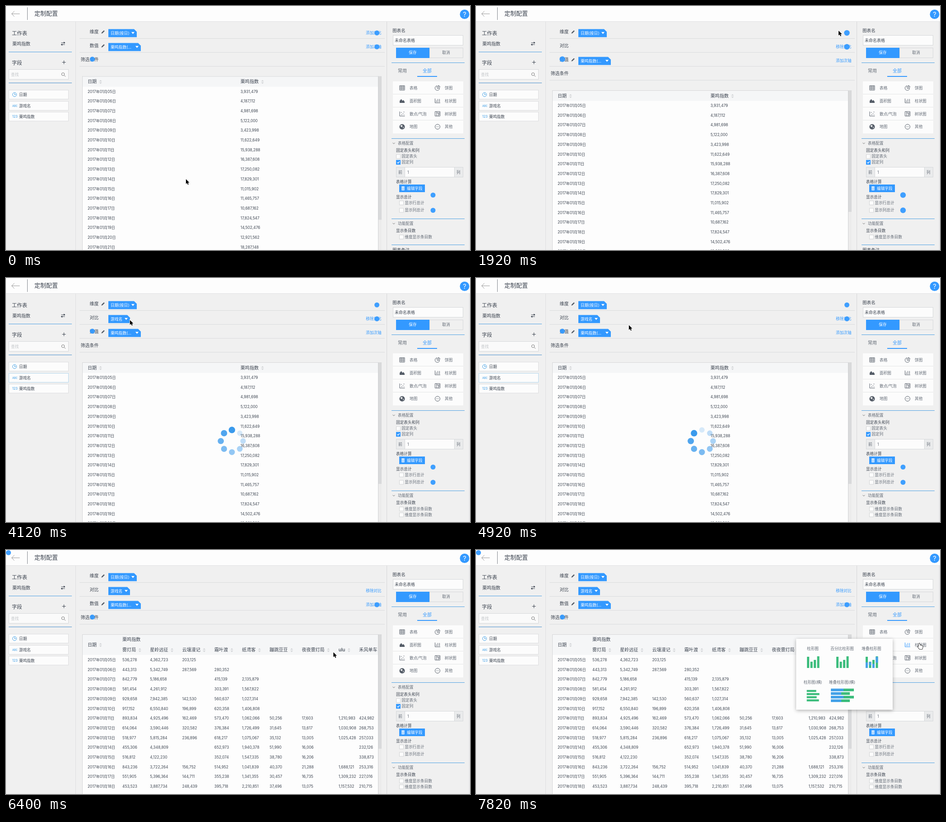
An HTML page with a canvas that plays this animation: 1029x544 px, repeating every 8000 ms.

```html
<!DOCTYPE html>
<html lang="zh-CN">
<head>
<meta charset="utf-8">
<style>
html, body { margin: 0; width: 100%; height: 100%; overflow: hidden; background: #f0f0f0; }
canvas { display: block; }
</style>
</head>
<body>
<canvas id="stage" width="1029" height="544"></canvas>
<script>
const c = document.getElementById('stage').getContext('2d');
const LOOP = 8000, ADD_ROW = 1450, GRAB = 3080, DROP = 3850, LOADED = 5300, PIE = 6850, BARS = 7200;
const BLUE = '#3399ff', INK = '#3c4450', SOFT = '#626a75', EDGE = '#d6d8da', PAPER = '#fcfcfc';
const GREEN = '#3dbd7d', SKY = '#45a2e8', METRIC = '栗鸣指数';

// Game name, lowest daily value, first day with data
const games = [['雾灯局', 43e4, 0], ['星岭远征', 34e5, 0], ['云壤漫记', 14e4, 0], ['霜叶渡', 28e4, 1],
  ['纸鸢客', 1e6, 2], ['蹦跳豆豆', 3e4, 6], ['夜夜雾灯局', 13e3, 6], ['ulu', 1e6, 6], ['禾风单车', 21e4, 6]];

const random = (i, j) => {
  const v = Math.sin(i * 12.99 + j * 78.23 + 4) * 43758.55;
  return v - Math.floor(v);
};
const group = n => Math.round(n).toLocaleString('en-US');
const total = i => group(i < 5 ? 29e5 + 32e5 * random(i, 9) : 105e5 + 8e6 * random(i, 9));
function gameValue(i, j) {
  const [, low, start] = games[j];
  const gap = j % 5 === 2 && (i % 7) >> 1 === 1;
  return i < start || gap ? '' : group(low * (1 + 1.4 * random(i, j) ** 2));
}

// Pointer moves: start, end, x, y
const moves = [[90, 1040, 812, 57], [1450, 1900, 804, 55], [2210, 2850, 85, 222], [3080, 3280, 122, 189],
  [3280, 3800, 265, 92], [3950, 4700, 339, 105], [4920, 5500, 268, 244], [5690, 6640, 812, 225],
  [6640, 6900, 963, 203], [7100, 7300, 985, 214]];

function pointerAt(t) {
  let x = 399, y = 386;
  for (const [start, end, toX, toY] of moves) {
    const u = Math.min(1, Math.max(0, (t - start) / (end - start))), e = u * u * (3 - 2 * u);
    x += (toX - x) * e;
    y += (toY - y) * e;
  }
  return [x, y];
}

// y is the optical middle of the text
function text(s, x, y, size = 8.67, color = INK, weight = 400, align = 'left') {
  c.font = `${weight} ${size}px Inter, "Noto Sans CJK SC", "Noto Sans CJK", sans-serif`;
  c.textAlign = align;
  c.fillStyle = color;
  c.fillText(s, x, y + size * .37);
  return c.measureText(s).width;
}
function rect(x, y, w, h, fill, stroke) {
  if (fill) { c.fillStyle = fill; c.fillRect(x, y, w, h); }
  if (stroke) { c.strokeStyle = stroke; c.lineWidth = 1; c.strokeRect(x + .5, y + .5, w - 1, h - 1); }
}
function path(d, x, y, fill, stroke, width = 1) {
  const p = new Path2D(d);
  c.save();
  c.translate(x, y);
  if (stroke) { c.strokeStyle = stroke; c.lineWidth = width; c.stroke(p); }
  if (fill) { c.fillStyle = fill; c.fill(p); }
  c.restore();
}
function disc(x, y, r, fill, stroke, width = 1, from = 0, to = 2 * Math.PI) {
  c.beginPath();
  c.arc(x, y, r, from, to);
  if (fill) { c.fillStyle = fill; c.fill(); }
  if (stroke) { c.strokeStyle = stroke; c.lineWidth = width; c.stroke(); }
}
const rule = (x, y, w, color = '#4da0e3') => rect(x, y, w, 1, color);

function header() {
  rect(0, 0, 1029, 34, '#fdfdfd');
  rule(0, 34, 1029, '#e2e3e4');
  path('M18 0H0M6-6L0 0 6 6', 12.5, 17.5, null, '#999');
  rect(47, 3, 1, 28, '#83878c');
  text('定制配置', 63, 16.5, 13, INK, 500);
  disc(1017, 18.5, 10.5, BLUE);
  text('?', 1017, 18.5, 15, '#fff', 400, 'center');
}

function fieldItem(x, y, label, border = '#dcdddf') {
  rect(x, y, 133, 21, PAPER, border);
  const cy = y + 10.5;
  if (label === '日期') {
    disc(x + 13, cy, 4.5, null, SKY);
    path('M0-3V0H3', x + 13, cy, null, SKY);
  } else {
    const abc = label === '游戏名';
    text(abc ? 'ABC' : '123', x + 8, cy, abc ? 5.5 : 7, SKY, 500);
  }
  text(label, x + 23, cy);
}

function leftPanel(t) {
  rect(154, 35, 1, 509, '#dddee0');
  text('工作表', 13, 61, 11.33);
  text(METRIC, 14, 84, 10);
  path('M-4-2H4M-4 2H4', 126.5, 84, null, INK);
  path('M1.5-4.5L5-2 1.5 0ZM-1.5 4.5L-5 2-1.5 0Z', 126.5, 84, INK);
  rule(6, 102, 140);
  text('字段', 13, 126.5, 11.33);
  path('M-4 0H4M0-4V4', 128.5, 125.5, null, INK);
  rect(6, 141, 133, 23, '#fafafa', EDGE);
  text('查找', 11, 153, 8.67, '#c2c5c8');
  disc(126.5, 152, 3.2, null, '#777');
  path('M0 0L3 3', 129, 154.5, null, '#777');
  rule(6, 171, 140, '#4a90cc');
  fieldItem(6, 187, '日期');
  fieldItem(6, 212, '游戏名', t > 2800 && t < DROP ? '#4fb0f0' : t >= DROP && t < LOADED ? '#b5d8ee' : undefined);
  fieldItem(6, 236, METRIC);
}

function shelf(label, y, tag, width, link) {
  text(label, 185.5, y, 10);
  if (tag) {
    if (label !== '对比') path('M-3.5 3.5L-2.8 1 2-3.8 3.8-2-1 2.8Z', 215, y + 1, '#555c66');
    path(`M0 0H${width - 6}L${width} 6V18H0Z`, 227, y - 5.5, BLUE);
    text(tag, 232, y + 3.5, 8.8, '#fff');
    path('M-3.5-2H3.5L0 2.5Z', 227 + width - 8.5, y + 3, '#fff');
  }
  if (link) text(link, 798, y + 3, 8.67, BLUE);
  rule(163, y + 15, 677, '#dadbdd');
}

function shelves(t) {
  const split = t >= ADD_ROW, y = split ? 119 : 88;
  shelf('维度', 57, '日期(按日)', 63, split ? '' : '添加对比');
  if (split) shelf('对比', 88, t >= DROP ? '游戏名' : '', 48, '移除对比');
  shelf('数值', y, METRIC + '(...', 72, '添加次轴');
  text('筛选条件', 165.5, y + 31, 10);
  rule(163, y + 46, 677, '#dadbdd');
}

function sortable(label, x, y) {
  const w = text(label, x, y, 10.1, INK, 500);
  path('M-3-1H3L0-4.5ZM-3 1H3L0 4.5Z', x + w + 8.5, y + .7, '#d3d5d8');
  return w;
}

function table(t) {
  const wide = t >= LOADED, top = t >= ADD_ROW ? 188 : 156.5;
  const headH = wide ? 46 : 23.5, rowY = i => top + (wide ? 57 : 34) + i * 21.69;
  rect(170, top, 655, 400, '#fdfdfd');
  rect(170, top, 655, headH, '#f5f6f7');
  rect(825, top, 8, 400, '#ececec');
  rect(825, top, 8, wide ? 255 : top > 180 ? 271 : 320, '#d9dadb');
  rect(169, top, 1, 400, '#d6d7d9');
  rect(825, top, 1, 400, '#cfd0d2');
  rule(169, top, 657, '#d6d7d9');
  c.save();
  c.beginPath();
  c.rect(170, top, 656, 400);
  c.clip();
  sortable('日期', 181, top + (wide ? 23 : 12));
  for (let i = 0; i < 17; i++) {
    text(`2017年01月${String(i + 5).padStart(2, '0')}日`, 181, rowY(i), 8.4);
    if (!wide) text(total(i), 520, rowY(i), 8.4);
  }
  if (wide) {
    text(METRIC, 258, top + 11.5, 10.1, INK, 500);
    let x = 258;
    games.forEach(([name], j) => {
      const step = sortable(name, x, top + 34.5) + 31;
      for (let i = 0; i < 15; i++) text(gameValue(i, j), x, rowY(i), 8.4);
      x += step;
    });
  } else sortable(METRIC, 520, top + 12);
  c.restore();
}

const kinds = [
  ['表格', 'M-5.5-5H5.5V5H-5.5ZM-5.5-2H5.5M-5.5 1.5H5.5M-2-5V5M2-5V5'],
  ['饼图', 'M-1-4.5A5 5 0 1 0 4.5 1H-1ZM1.5-5.5A4.5 4.5 0 0 1 5.5-1.5H1.5Z'],
  ['面积图', 'M-5.5 4.5V0L-2-4 1 0 3-2 5.5 2V4.5Z', true],
  ['柱状图', 'M-5.5-5V4.5H6M-2.5 3V-1M.8 3V-4M4.5 3V-4'],
  ['散点/气泡', 'M-5.5-5V5H6M-3-3h2M-2 2h2M1 0h2M3-4h2M4 2h1'],
  ['树状图', 'M-5.5-5H5.5V5H-5.5ZM-2-5V5M-2-2H5.5M2-2V5M2 1H5.5'],
  ['地图', 'M0-6A6 6 0 1 0 0 6 6 6 0 1 0 0-6Z', true],
  ['其他', 'M0-5.5A5.5 5.5 0 1 0 0 5.5 5.5 5.5 0 1 0 0-5.5M-3 0h1.3M-.7 0h1.3M1.7 0h1.3']
];

function chartPicker(t) {
  rect(858, 168, 156, 116, PAPER);
  const active = t >= BARS ? '柱状图' : t >= PIE ? '饼图' : '';
  kinds.forEach(([label, d, solid], i) => {
    const right = i % 2, y = 182.5 + (i >> 1) * 28.9, color = label === active ? BLUE : '#555d68';
    if (!right && i) rule(858, Math.round(y - 15), 156, '#e4e5e6');
    path(d, right ? 957 : 878.5, y, solid && color, solid ? null : color);
    if (label === '地图') path('M-4-3L0-4 1-1-2 1ZM2 0L4 1 2 4Z', 878.5, y, '#eee');
    text(label, right ? 973 : 895, y, 8.67, SOFT);
  });
}

function check(x, y, label, on) {
  rect(x, y - 4.5, 10, 10, on ? BLUE : PAPER, on ? BLUE : '#d2d4d6');
  if (on) path('M-2.5 0L-.5 2 3-2', x + 5, y + .5, null, '#fff', 1.4);
  text(label, x + 12.3, y, 8.67, SOFT);
}
function section(label, y) {
  rule(855, y - 11, 162);
  path('M-2.5-1.2L0 1.3 2.5-1.2', 860, y, null, '#777');
  text(label, 869, y, 8.67, SOFT);
}
const subtitle = (s, y) => text(s, 865, y, 8.67, INK, 500);

function rightPanel(t) {
  rect(844, 35, 1, 509, '#d5d6d8');
  rect(1027, 35, 1, 509, '#dcdddf');
  text('图表名', 857, 54, 9.6);
  rect(858, 65, 156, 23, PAPER, EDGE);
  text('未命名表格', 862, 76.5, 9);
  rect(865, 93, 74, 23, BLUE);
  rect(939, 93, 75, 23, null, EDGE);
  text('保存', 902, 104, 8.67, '#fff', 400, 'center');
  text('取消', 976, 104, 8.67, SOFT, 400, 'center');
  rule(855, 126, 162);
  text('常用', 869, 144, 10, SOFT);
  text('全部', 924, 144, 10, BLUE);
  rect(912, 156, 44, 2, BLUE);
  chartPicker(t);
  section('表格配置', 306);
  subtitle('固定表头和列', 322);
  check(865, 335, '固定表头');
  check(865, 348, '固定列', true);
  rect(865, 359, 149, 23, '#eaebec', EDGE);
  rect(884, 359, 111, 23, PAPER, EDGE);
  text('前', 870, 370.5, 8.67, SOFT);
  text('1', 890, 371, 8.67, SOFT);
  text('列', 999, 370.5, 8.67, SOFT);
  subtitle('表格计算', 391.5);
  rect(872, 398, 57, 17, BLUE);
  rect(877.5, 402, 6, 9, '#fff');
  path('M-2-2.5H2M-2 .5H2M-2 2.5H2', 880.5, 406.5, null, BLUE);
  text('编辑字段', 889, 407, 8.67, '#fff');
  subtitle('显示总计', 425.5);
  check(872, 438.5, '显示行总计');
  check(872, 455, '显示列总计');
  section('功能配置', 485);
  subtitle('显示条目数', 501);
  check(872, 514.5, '维度显示条目数');
  if (t >= DROP) check(872, 527.5, '维度显示条目数');
  else {
    rule(855, 532, 162);
    text('图表备注', 857, 543.5, 9.6);
  }
}

function beacons(t) {
  const r = 5.5 + 1.6 * Math.exp(-((((t % 1280) - 560) / 90) ** 2));
  const spots = t < LOADED
    ? [[822.5, 60], [822.5, 91], [191.5, 118.5], [947, 421.5], [947, 455.5]]
    : [[822.5, 122], [191.5, 149.5], [5.5, 6]];
  spots.forEach(([x, y]) => disc(x, y, r, 'rgba(51,153,255,.94)'));
}

function spinner(t) {
  const head = Math.floor((t - 4880) / 125);
  for (let i = 0; i < 8; i++) {
    const a = (5 + head - i) * Math.PI / 4, k = 1 - i / 7;
    c.globalAlpha = .2 + .8 * k;
    disc(501 + 24.7 * Math.cos(a), 363.5 + 24.7 * Math.sin(a), 6 + 1.2 * k, '#3a9aec');
  }
  c.globalAlpha = 1;
}

function popup(x, y, w, h) {
  c.save();
  c.shadowColor = 'rgba(0,0,0,.3)';
  c.shadowBlur = 8;
  c.shadowOffsetY = 2;
  rect(x, y, w, h, '#fdfdfd');
  c.restore();
}
const caption = (s, x, y) => text(s, x, y, 8.67, SOFT, 400, 'center');

function piePopup() {
  popup(716, 169, 208, 83);
  ['扇形图', '雷达图', '环状图'].forEach((s, i) => caption(s, 753 + i * 65, 190.5));
  path('M2-12A12.5 12.5 0 1 1-11 1H2Z', 753, 221, null, '#999', 1.5);
  path('M-1-14A13 13 0 0 0-13-2H-1Z', 753, 221, SKY);
  path('M1-15L11-8 9 8-3 10-10 4-9-8Z', 818, 221, '#a3bdd6');
  path('M-8-5L5-12 9 5 1 14-12 6Z', 818, 221, 'rgba(70,145,210,.65)');
  path('M-7 3L-3 10 2 14 9 6 4 10Z', 818, 221, '#d9bd98');
  ['#2f62dd', '#2f62dd', '#49c83f', '#31a5ee', '#f2c12e'].forEach((color, i) =>
    disc(883, 221, 13.5, null, color, 3.5, i * 1.257 + .1, i * 1.257 + 1.25));
}

function barsPopup() {
  popup(710, 198, 214, 158);
  ['柱形图', '百分比柱形图', '堆叠柱形图'].forEach((s, i) => {
    caption(s, 747 + i * 65, 219.5);
    [25, 14, 18, 26].forEach((h, j) => {
      const x = 734 + i * 65 + j * 7.5;
      rect(x, 263 - h, 5, h, GREEN);
      if (i === 2) rect(x, 263 - h * (j % 2 ? .95 : .5), 5, h * .5, SKY);
    });
  });
  caption('柱形图(横)', 747, 294.5);
  caption('堆叠柱形图(横)', 812, 294.5);
  [21, 28, 22, 27].forEach((w, i) => {
    const full = i % 2 ? 42 : 51;
    rect(733.5, 312 + i * 7, w, 4.5, GREEN);
    rect(787, 309 + i * 8, full, 6, GREEN);
    rect(787, 309 + i * 8, full * .55, 6, SKY);
  });
}

function dragGhost(t) {
  const [x, y] = pointerAt(t - 60);
  c.globalAlpha = .25;
  fieldItem(x - 79, y - 10, '游戏名', '#dfe3e6');
  c.globalAlpha = 1;
}

function pointer(t) {
  const [x, y] = pointerAt(t);
  if (t > 5480 && t < 5800)
    path('M-3-5.5Q0-5.5 0-4V4Q0 5.5-3 5.5M3-5.5Q0-5.5 0-4V4Q0 5.5 3 5.5M-1.5 1H1.5', x, y, null, '#222');
  else if (x > 858 || t > 1000 && t < ADD_ROW)
    path('M-3-5Q-2-7-1-5L0-1Q1-2.5 2.2-1 3.5-2 4.3-.3 5.7-.7 5.7 1V3L4.5 7H-1.5L-5.5 1.5Q-5 0-3 1.5ZM0-1V1M2.2-1V1M4.3-.3V1.5',
      x, y, '#fff', '#111', 1.6);
  else
    path('M0 0V10.8L2.5 8.5 4.2 12.4 6 11.6 4.4 7.8H7.7Z', x, y, '#000', '#fff', 1.6);
}

function draw(now) {
  const t = now % LOOP;
  rect(0, 0, 1029, 544, '#f0f0f0');
  header();
  leftPanel(t);
  shelves(t);
  table(t);
  rightPanel(t);
  beacons(t);
  if (t >= DROP && t < LOADED) spinner(t);
  if (t >= BARS) barsPopup();
  else if (t >= PIE) piePopup();
  if (t >= GRAB && t < DROP) dragGhost(t);
  pointer(t);
}

function tick() {
  draw(performance.now());
  requestAnimationFrame(tick);
}
tick();
</script>
</body>
</html>
```
